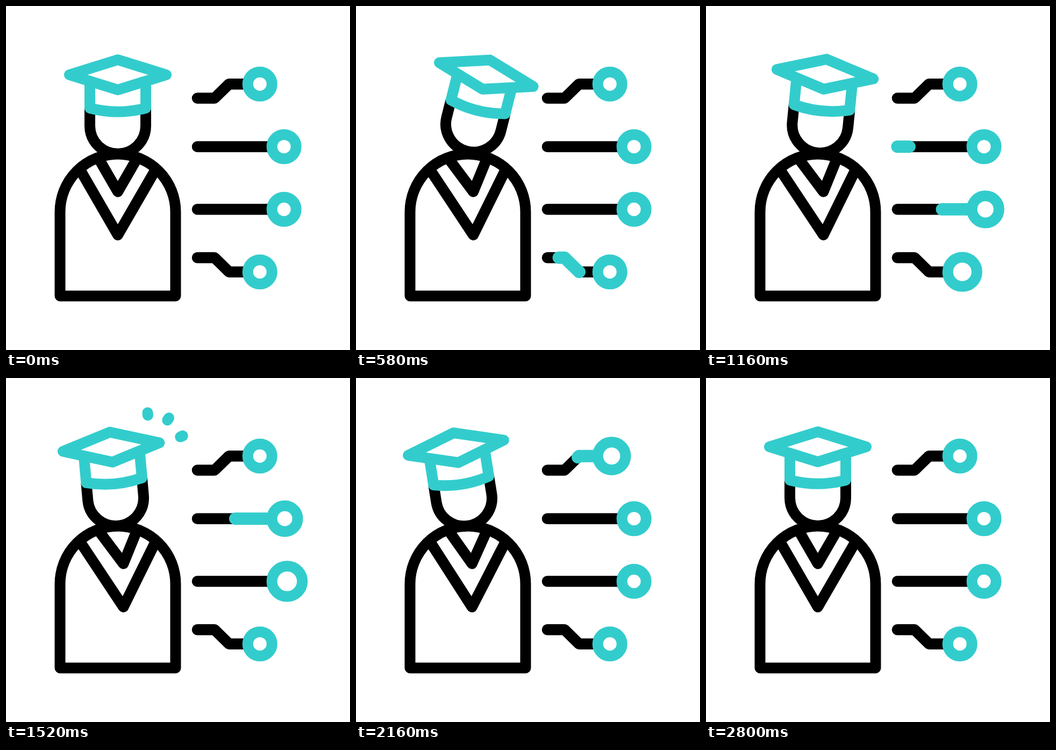
Write an HTML page that moves like this. It is 640 by 640 pixels and loops after 3000 ms.

```html
<!DOCTYPE html>
<html lang="en">
<head>
<meta charset="utf-8">
<title>Graduate skills</title>
<style>
  html, body { margin: 0; width: 100%; height: 100%; overflow: hidden; background: #fff; }
  svg { display: block; width: 100vw; height: 100vh; fill: none; stroke: #000; stroke-width: 20; stroke-linejoin: round; }
  .teal { stroke: #33cccc; }
  .round { stroke-linecap: round; }
  .pulse { stroke-width: 23; }
</style>
</head>
<body>
<svg viewBox="0 0 640 640">
  <g id="head">
    <path d="M156 190V223A52 52 0 0 0 260 223V190"/>
    <path class="teal" d="M156 140V190Q208 203.500 260 190V140"/>
    <path class="teal" d="M118 128L208 100L298 128L208 156Z"/>
  </g>
  <path d="M100.500 539.500V383A107.500 107.500 0 0 1 315.500 383V539.500Z"/>
  <path id="collar"/>
  <g id="links"></g>
  <g id="sparks"></g>
</svg>
<script>
const LOOP = 3000;
const $ = id => document.getElementById(id);

function add(parent, tag, attrs) {
  const el = document.createElementNS('http://www.w3.org/2000/svg', tag);
  for (const k in attrs) el.setAttribute(k, attrs[k]);
  return parent.appendChild(el);
}

const ramp = (t, a, b) => Math.min(1, Math.max(0, (t - a) / (b - a)));
const ease = p => (1 - Math.cos(Math.PI * p)) / 2;
const swing = (t, a, b) => ease(ramp(t, a, b));
const settle = t => ease(1 - Math.pow(1 - ramp(t, 1990, 2800), 1.7));

// Show only the part of a path between two fractions of its length.
function trim(path, from, to) {
  const len = path.getTotalLength();
  path.style.visibility = to > from && to > 0 && from < 1 ? 'visible' : 'hidden';
  path.style.strokeDasharray = `${Math.max(0.01, (to - from) * len)} 999`;
  path.style.strokeDashoffset = -from * len;
}

// Lines with a ring at the end: path, ring centre, pulse start time.
const links = [
  ['M356 171.500H388L415 145.200H445', 472.3, 145.2, 1580],
  ['M356 261.700H490', 517.2, 261.7, 1000],
  ['M356 378.300H490', 517.2, 378.3, 600],
  ['M356 468.200H388L415 494.700H445', 472.3, 494.7, 200]
].map(([d, x, y, start]) => {
  add($('links'), 'path', { d, class: 'round', 'stroke-width': 20.5 });
  const pulse = add($('links'), 'path', { d, class: 'teal round pulse' });
  const ring = add($('links'), 'circle', { cy: y, class: 'teal' });
  return { pulse, ring, x, start };
});

const sparks = [
  'M264.500 76L262.200 49.700',
  'M296.500 84L311.500 62',
  'M318 112L342.500 102'
].map(d => add($('sparks'), 'path', { d, class: 'teal round' }));

function draw(t) {
  const lean = swing(t, 200, 620);
  const back = settle(t);
  const angle = 14.5 * lean - 26.5 * swing(t, 620, 1990) + 12 * back;
  const lift = -0.33 * Math.max(0, angle);
  $('head').setAttribute('transform', `translate(0 ${lift}) rotate(${angle} 208 268)`);

  const tip = 208 + 10.4 * (lean - back);
  $('collar').setAttribute('d', `M138 305L${tip} 426L278 305M173 285L${tip} 345.500L243 285`);

  for (const { pulse, ring, x, start } of links) {
    const u = t - start;
    trim(pulse, swing(u, 180, 840), swing(u, 0, 600));
    const grow = 8 * (swing(u, 420, 780) - swing(u, 780, 1180));
    ring.setAttribute('r', 22.5 + grow);
    ring.setAttribute('cx', x + grow);
  }

  for (const s of sparks) trim(s, ramp(t, 1310, 2140), swing(t, 1300, 1780));
}

const begin = performance.now();
function tick() {
  draw((performance.now() - begin) % LOOP);
  requestAnimationFrame(tick);
}
tick();
</script>
</body>
</html>
```
